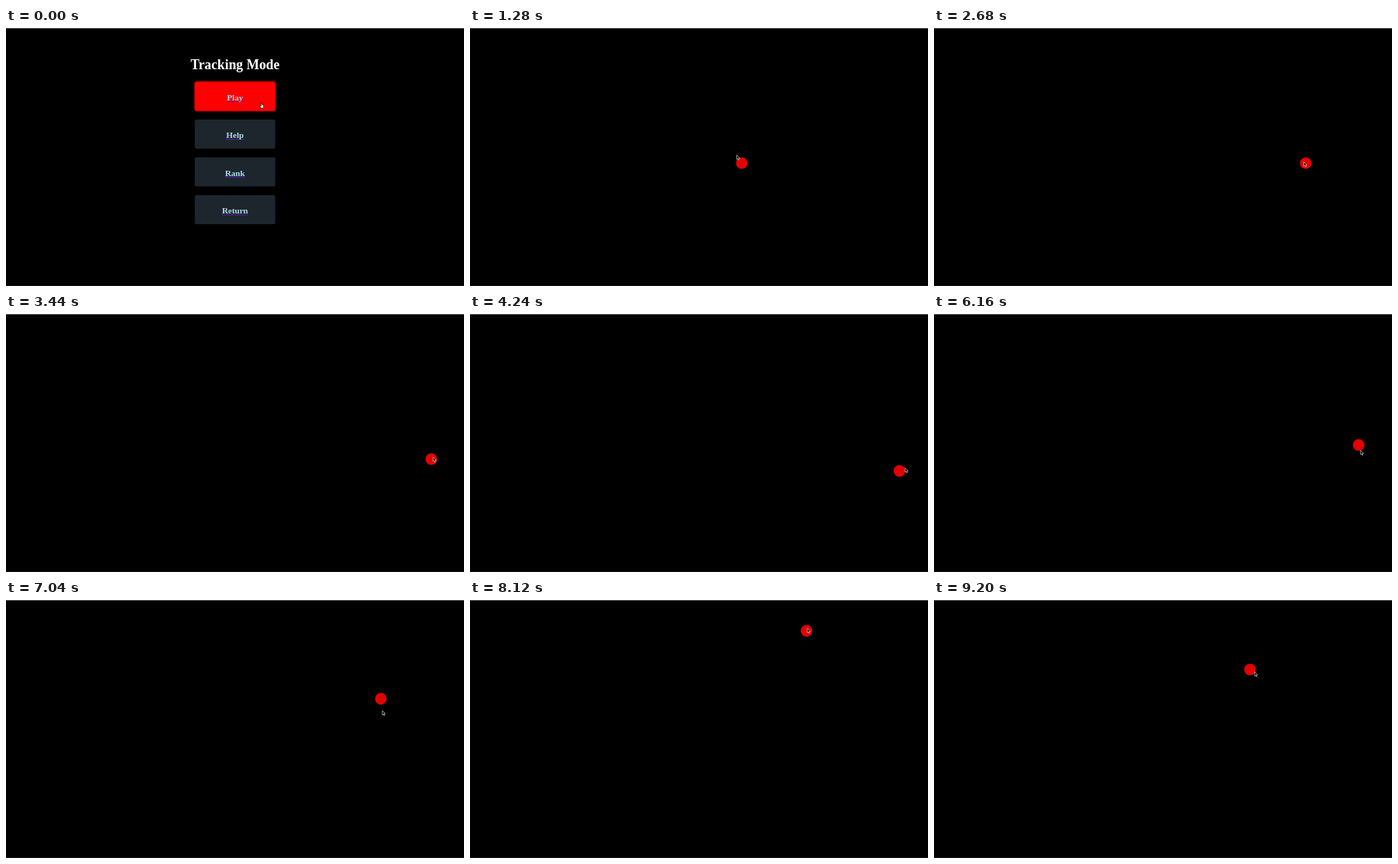
An HTML page with a canvas for the animation above (9.24 s loop, 600 by 338 pixels).

```html
<!DOCTYPE html>
<html lang="en">
<head>
<meta charset="utf-8">
<title>Tracking Mode</title>
<style>
  html, body { margin: 0; width: 100%; height: 100%; overflow: hidden; background: #000; }
  canvas { display: block; width: 600px; height: 338px; }
</style>
</head>
<body>
<canvas id="stage" width="600" height="338"></canvas>
<script>
const ctx = document.getElementById('stage').getContext('2d');
const LOOP = 9240, STEP = 40;
const GAME_START = 680, MOVE_START = 757, TURN_EVERY = 2000;
const START = [307, 177], RIGHT = 596.8, TOP = 20;

// The ball takes a new velocity (px per ms) at every turn.
const VELOCITIES = [
  [0.0936, 0], [0.0923, 0.0193], [0.0873, -0.0314], [-0.0465, -0.0825], [0.0063, 0.0876]
];

// How far the hand strays from the ball: [time, dx, dy]
const AIM = [
  [680, 27, -79], [1100, -39, -19], [1280, -6.5, -10.5], [2680, -2.5, -1.5],
  [4240, 7.5, -4], [5240, 3, -2], [7040, 2, 15.5], [8360, 1, -5],
  [8640, -3, -23], [9200, 6, 3]
];

// Constant velocity between turns, bouncing off the right and top edges.
function ballAt(t) {
  let [x, y] = START, left = Math.max(0, t - MOVE_START);
  for (const [vx, vy] of VELOCITIES) {
    const dt = Math.min(left, TURN_EVERY);
    x = RIGHT - Math.abs(RIGHT - x - vx * dt);
    y = TOP + Math.abs(y + vy * dt - TOP);
    left -= dt;
  }
  return [x, y];
}

function pointerAt(t) {
  let i = 0;
  while (i < AIM.length - 2 && t >= AIM[i + 1][0]) i++;
  const a = AIM[i], b = AIM[i + 1];
  const u = Math.min(1, Math.max(0, (t - a[0]) / (b[0] - a[0])));
  const ease = u * u * (3 - 2 * u);
  return ballAt(t).map((p, k) => p + a[k + 1] + (b[k + 1] - a[k + 1]) * ease);
}

function drawButton(label, y, active) {
  ctx.save();
  ctx.fillStyle = active ? '#ff0000' : '#1d262d';
  if (active) {
    ctx.shadowColor = '#ff0000';
    ctx.shadowBlur = 3;
  }
  ctx.beginPath();
  ctx.roundRect(247.3, y, 105.4, 38.2, 2);
  ctx.fill();
  ctx.restore();

  ctx.font = 'bold 11.2px "Liberation Serif", serif';
  const w = ctx.measureText(label).width;
  ctx.fillStyle = '#5a20b0';
  ctx.fillRect(300 - w / 2, y + 25.4, w, 1);
  ctx.fillStyle = '#add8e6';
  ctx.fillText(label, 300, y + 24.3);
}

function drawMenu() {
  ctx.textAlign = 'center';
  ctx.fillStyle = '#fff';
  ctx.font = 'bold 17.8px "Liberation Serif", serif';
  ctx.fillText('Tracking Mode', 300, 54);
  ['Play', 'Help', 'Rank', 'Return'].forEach((label, i) =>
    drawButton(label, 70.4 + i * 49.5, i === 0));
}

function drawBall([x, y]) {
  ctx.fillStyle = '#e30000';
  ctx.beginPath();
  ctx.arc(x, y, 7.6, 0, Math.PI * 2);
  ctx.fill();
}

function drawPointer([x, y], outline, fill, stroke) {
  ctx.save();
  ctx.translate(x, y);
  const path = new Path2D(outline);
  ctx.fillStyle = fill;
  ctx.fill(path);
  ctx.strokeStyle = stroke;
  ctx.lineWidth = 0.7;
  ctx.stroke(path);
  ctx.restore();
}

const ARROW = 'M0 0V5.6L1.3 4.5L2.2 6.6L3.1 6.2L2.3 4.1H4Z';
const HAND = 'M0 0H1L1.3 2.3L3.6 2.9L3.5 5.5L2.8 7H.2L-1.6 4.2L-.9 3.6L.2 4.4Z';

function draw(t) {
  ctx.fillStyle = '#000';
  ctx.fillRect(0, 0, 600, 338);
  ctx.fillStyle = '#5a5a5a';
  ctx.fillRect(0, 0, 600, 1);
  ctx.fillStyle = '#141414';
  ctx.fillRect(0, 337, 600, 1);

  if (t < GAME_START) {
    drawMenu();
    drawPointer(pointerAt(t), HAND, '#fff', '#200');
  } else {
    drawBall(ballAt(t));
    drawPointer(pointerAt(t), ARROW, '#000', '#d0d0d0');
  }
}

const start = performance.now();
function frame() {
  const t = (performance.now() - start) % LOOP;
  draw(Math.floor(t / STEP) * STEP);
  requestAnimationFrame(frame);
}
frame();
</script>
</body>
</html>
```
